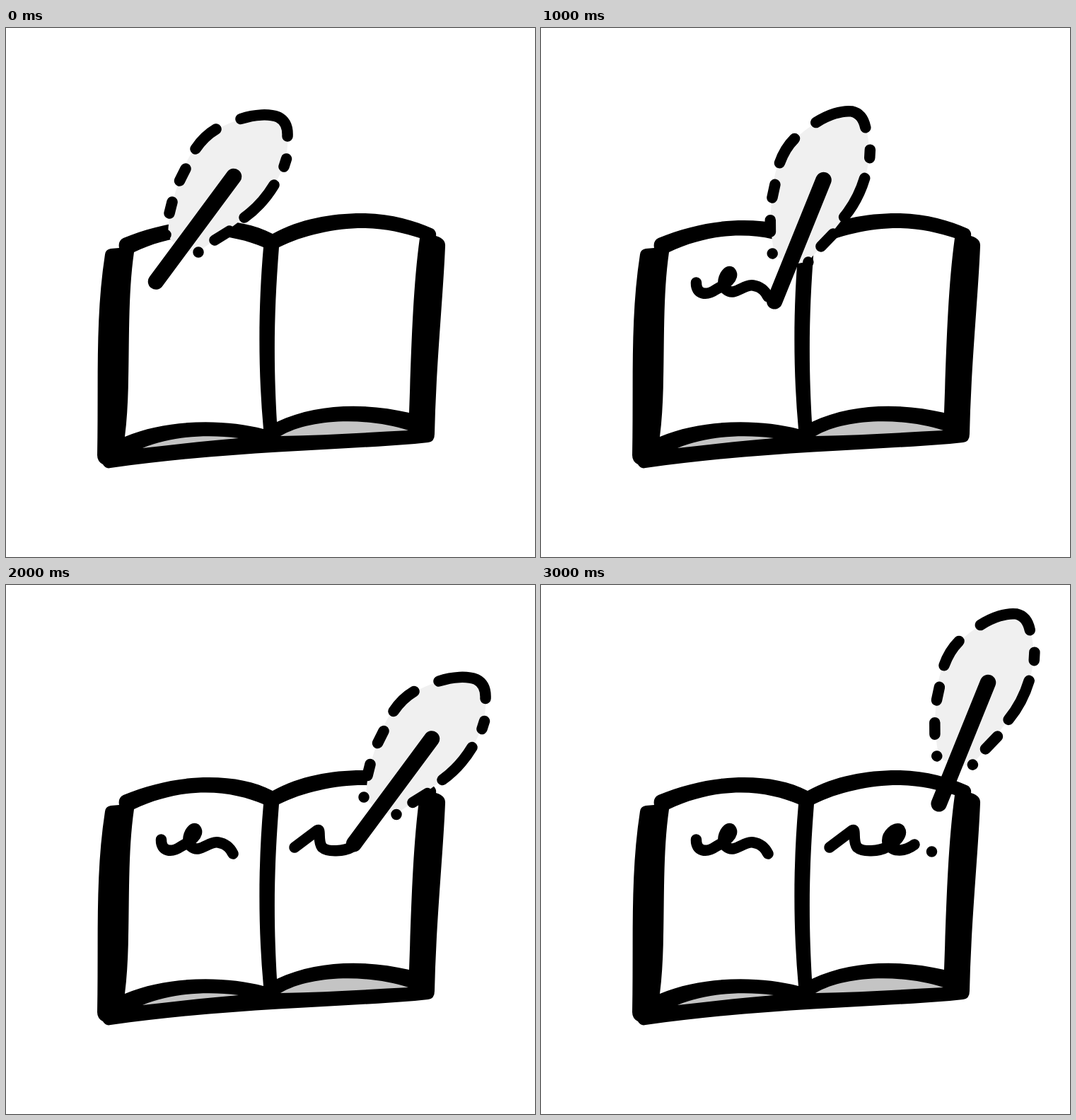
An HTML page that plays this animation: 748 by 748 pixels, repeating every 4000 ms.

```html
<!DOCTYPE html>
<html lang="en">
<head>
<meta charset="utf-8">
<title>Quill writing in a book</title>
<style>
  html, body { margin: 0; width: 100%; height: 100%; overflow: hidden; background: #fff; }
  svg { display: block; width: 100%; height: 100%; }
  .line { fill: none; stroke: #000; stroke-width: 15.5; stroke-linecap: round; stroke-linejoin: round; }
  .shaft { stroke-width: 22.5; }
  .page { fill: #fff; }
  .edge { fill: #c4c4c4; }
</style>
</head>
<body>
<svg viewBox="0 0 748 748">
  <g id="book">
    <path d="M148 312 L160 311 Q158 301 166 297 C205 281 245 272 287 272 C322 272 352 278 377 291
      C415 270 460 262 503 262 C543 262 577 272 604 284 Q609 288 608 294 Q622 298 621 309
      C618 380 608 480 606 574 Q606 585 597 586 L578 588 C450 598 300 600 148 622
      Q141 624 137 617 Q129 613 129 604 C131 500 126 410 140 320 Q141 313 148 312Z"/>
    <path class="page" d="M181 317 C215 301 250 293.5 282 293.5 C315 293.5 343 301 364 310
      C357 390 356 480 364 567 C310 553 230 552 168 578 C178 500 169 400 181 317Z"/>
    <path class="page" d="M386 310 C420 293 465 283 505 283 C535 283 563 290 585 297
      C575 370 573 460 570 544 C510 530 440 530 383 557 C378 470 379 400 386 310Z"/>
    <path class="edge" d="M193 594 C235 577 285 574 329 580 C280 584 240 589 193 594Z"/>
    <path class="edge" d="M388 577 C430 552 510 550 569 569 C510 572 450 576 388 577Z"/>
  </g>
  <g id="words" class="line">
    <path d="M219.5 360 C219 377 234 379 247 370 C262 362 274 352 268 345 C262 342 252 362 262 370
      C274 380 286 362 300 364 C313 366 318 374 321 380"/>
    <path d="M408 371 L440 347 C446 343 440 362 447 371 C455 378 478 377 490 370"/>
    <path d="M490 370 C502 363 512 353 507 345.5 C502 342 488 352 490 364 C494 377 512 379 528 367 M552.5 377h.01"/>
  </g>
  <!-- Quill origin: the top of its shaft -->
  <g id="quill">
    <g transform="translate(-322 -210)">
      <path fill="#f0f0f0" d="M229 292 C230 260 238 232 249 207 C258 175 280 145 332 129
        C352 122 372 121 385 126 Q399 133 398 153 C400 178 390 206 379 222 Q362 250 337 268
        L295 300 L272 316 L254 315 L233 300Z"/>
      <path class="line" d="M332 128.5 C352 122 372 121 385 126 Q399 133 398 153
        M297 143 Q280 153 268 171 M254 199 L245.5 216 M235 246 L231 262
        M396.5 185 L393 196 M379 222 Q362 250 337 268 M316 287 L295 300"/>
      <path class="line" d="M272 317h.01 M226 292.5h.01"/>
      <path class="line shaft" d="M322 210 L212 358.5"/>
    </g>
  </g>
</svg>
<script>
  const STEP = 1000;
  const poses = [
    { x: 322, y: 210, turn: 0, words: 0 },
    { x: 399.5, y: 215, turn: -14.5, words: 1 },
    { x: 602, y: 217.5, turn: 0, words: 2 },
    { x: 632, y: 138, turn: -14.5, words: 3 }
  ];
  const quill = document.getElementById('quill');
  const words = [...document.getElementById('words').children];

  function draw(time) {
    const pose = poses[Math.floor(time / STEP) % poses.length];
    quill.setAttribute('transform', `translate(${pose.x} ${pose.y}) rotate(${pose.turn})`);
    words.forEach((word, i) => word.setAttribute('visibility', i < pose.words ? 'visible' : 'hidden'));
  }

  const start = performance.now();
  function tick() {
    draw(performance.now() - start);
    requestAnimationFrame(tick);
  }
  tick();
</script>
</body>
</html>
```
